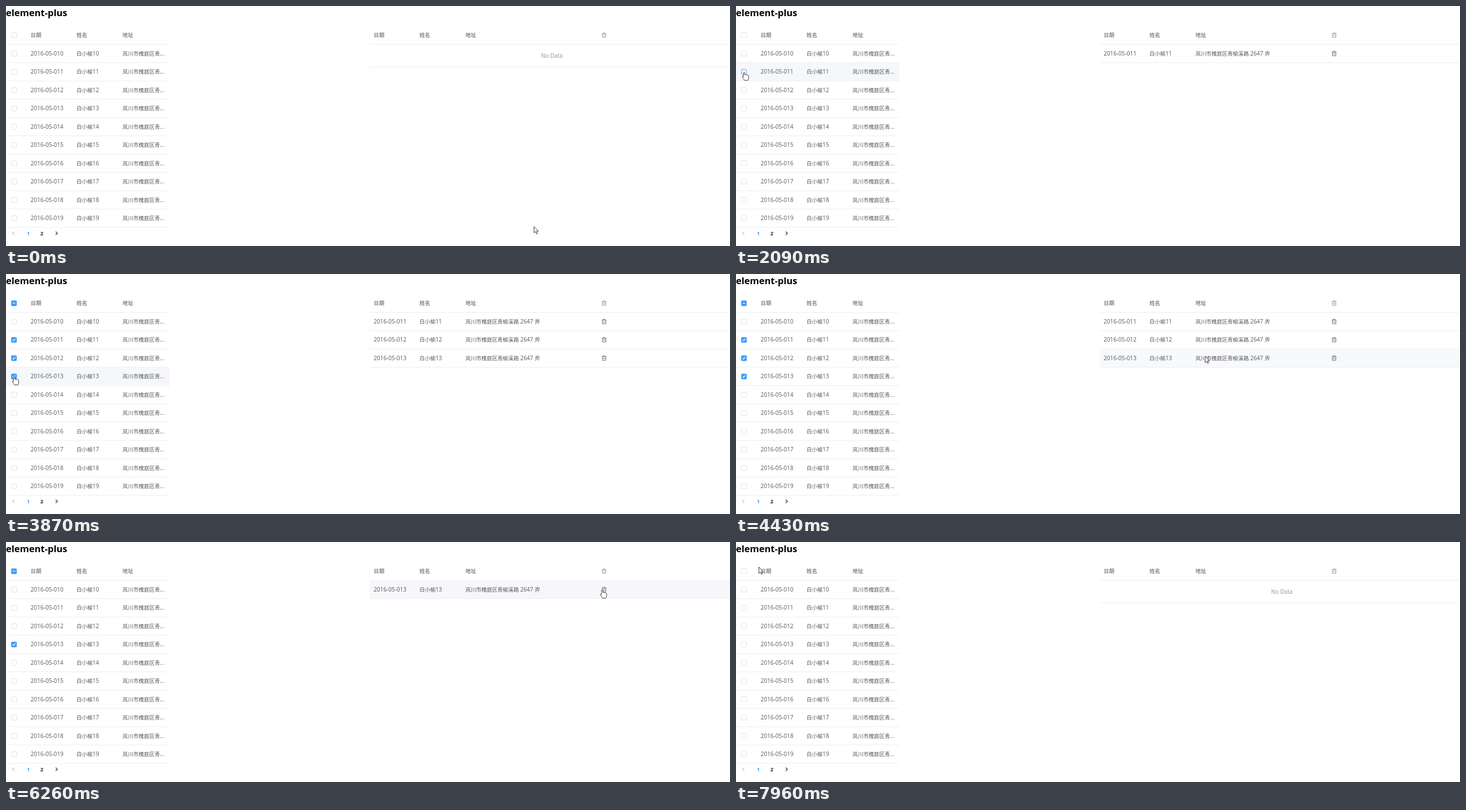
Write an HTML page with a canvas that moves like this. It is 1280 by 426 pixels and loops after 8000 ms.

```html
<!DOCTYPE html>
<html lang="zh-CN">
<head>
<meta charset="utf-8">
<title>element-plus</title>
<style>
html, body { margin: 0; width: 100%; height: 100%; overflow: hidden; background: #fff; }
canvas { display: block; }
</style>
</head>
<body>
<canvas id="stage" width="1280" height="426"></canvas>
<script>
const ctx = document.getElementById('stage').getContext('2d');
const LOOP = 8000, ROW = 32.45, TOP = 67.7, ROWS = 10;
const LEFT = { x: 0, width: 289, columns: [43.6, 124.8, 206] };
const RIGHT = { x: 643, width: 637, columns: [650, 731, 812.2] };
const BLUE = '#409eff', LINE = '#ebeef5', BODY = '#58595c', MUTED = '#858890';
const CJK = '"Noto Sans CJK SC", "Noto Sans CJK", sans-serif';
const LATIN = '"Open Sans", "Noto Sans", sans-serif';
const NAME = '白小榆', STREET = '岚川市槐庭区青榆溪路 2647 弄';

const clamp = v => Math.max(0, Math.min(1, v));
const lineY = i => TOP + ROW * i;
const midY = i => lineY(i + 0.5) + 0.6;

// Rows 1 to 3 are picked on the left, then removed on the right in the same order
const picks = [1, 2, 3].map(row => ({ row, on: 1345 + 735 * row, off: 4320 + 860 * row }));
const listed = t => picks.filter(p => t >= p.on && t < p.off);

// Each move sets off, arrives and rests until the next one
const checkboxAt = row => ({ x: 14.5, y: midY(row) });
const bin = { x: 1054, y: midY(0) };
const start = { x: 933.5, y: 391.5 };
const moves = [
  { from: 70, until: 70, to: { x: 598, y: 345 } },
  { from: 200, until: 1050, to: { x: -1.5, y: 215 } },
  { from: 1050, until: 1220, to: { x: -1.5, y: 142 } },
  { from: 1220, until: 1880, to: checkboxAt(1) },
  { from: 2350, until: 2490, to: checkboxAt(2) },
  { from: 3100, until: 3450, to: checkboxAt(3) },
  { from: 3900, until: 4430, to: { x: 829, y: 146 } },
  { from: 4430, until: 5060, to: bin },
  { from: 5450, until: 5640, to: { x: 1061.5, y: 81.5 } },
  { from: 5780, until: 5860, to: bin },
  { from: 6930, until: 7330, to: { x: 305.5, y: 98.5 } },
  { from: 7330, until: 7960, to: { x: 40.5, y: 44.5 } }
];

function cursorAt(t) {
  let { x, y } = start;
  for (const { from, until, to } of moves) {
    if (t < from) break;
    const k = clamp((t - from) / (until - from || 1)) || +(from === until);
    x += (to.x - x) * k;
    y += (to.y - y) * k;
  }
  return { x, y };
}

function isOver(t, table, row) {
  const { x, y } = cursorAt(t);
  return x >= table.x && x < table.x + table.width && y >= lineY(row) && y < lineY(row + 1);
}

// Share of the last 200 ms spent over the row, which gives the hover fade
function hoverTint(t, table, row) {
  let hits = 0;
  for (let ago = 0; ago < 200; ago += 20) hits += isOver(t - ago, table, row);
  return hits / 10;
}

function text(s, x, y, color = BODY, weight = 400) {
  ctx.fillStyle = color;
  for (const run of s.match(/[\u4e00-\u9fff]+|[^\u4e00-\u9fff]+/g)) {
    ctx.font = run > '\u4e00' ? `${weight} 9.45px ${CJK}` : `${weight} 10px ${LATIN}`;
    ctx.fillText(run, x, y);
    x += ctx.measureText(run).width;
  }
}

function rule(table, y) {
  ctx.fillStyle = LINE;
  ctx.fillRect(table.x, y, table.width, 1);
}

function stroke(d, x, y, color, width) {
  ctx.save();
  ctx.translate(x, y);
  ctx.strokeStyle = color;
  ctx.lineWidth = width;
  ctx.stroke(new Path2D(d));
  ctx.restore();
}

function checkbox(y, filled, mark, active) {
  ctx.beginPath();
  ctx.roundRect(9.6, y - 4.5, 9, 9, 1.2);
  ctx.lineWidth = 0.9;
  ctx.fillStyle = '#fff';
  ctx.strokeStyle = active ? BLUE : '#dcdfe6';
  ctx.fill();
  ctx.stroke();
  ctx.globalAlpha = filled;
  ctx.fillStyle = ctx.strokeStyle = BLUE;
  ctx.fill();
  ctx.stroke();
  stroke(mark, 14.1, y, '#fff', 1.1);
  ctx.globalAlpha = 1;
}

function trash(y, color) {
  stroke('M-4.2 -2.6H4.2M-1.8 -2.8V-4.2H1.8V-2.8M-3.1 -2.5V3.9H3.1V-2.5M-1.1 -.7V2.1M1.1 -.7V2.1',
    1057.5, y, color, 0.8);
}

function heading(table) {
  ['日期', '姓名', '地址'].forEach((s, i) => text(s, table.columns[i], 55.4, MUTED, 700));
  rule(table, lineY(0));
}

function record(t, table, place, id, address) {
  ctx.globalAlpha = hoverTint(t, table, place);
  ctx.fillStyle = '#f5f7fa';
  ctx.fillRect(table.x, lineY(place) + 1, table.width, ROW - 1);
  ctx.globalAlpha = 1;
  rule(table, lineY(place + 1));
  [`2016-05-01${id}`, `${NAME}1${id}`, address]
    .forEach((s, i) => text(s, table.columns[i], midY(place) + 3.5, BODY));
}

function leftTable(t, cursor) {
  heading(LEFT);
  checkbox(51.9, +(listed(t - 70).length > 0), 'M-2.4 0H2.4', false);
  for (let row = 0; row < ROWS; row++) {
    const pick = picks.find(p => p.row === row);
    const filled = pick ? clamp((t - pick.on - 100) / 100) * clamp((pick.off + 150 - t) / 100) : 0;
    record(t, LEFT, row, row, STREET.slice(0, 7) + '...');
    checkbox(midY(row), filled, 'M-2.4 0L-.7 1.8L2.5 -2', overCheckbox(cursor, row));
  }
}

function rightTable(t) {
  const rows = listed(t);
  heading(RIGHT);
  trash(51.9, MUTED);
  if (!rows.length) {
    text('No Data', 946, 92, '#909399');
    rule(RIGHT, 107.8);
  }
  rows.forEach((pick, place) => {
    record(t, RIGHT, place, pick.row, STREET);
    trash(midY(place), BODY);
  });
}

function pager() {
  const chevron = 'M-1.6 -3L1.6 0L-1.6 3';
  stroke('M1.6 -3L-1.6 0L1.6 3', 13, 403.5, '#c0c4cc', 1.1);
  stroke(chevron, 89.4, 403.5, '#303133', 1.1);
  ctx.font = `700 9px ${LATIN}`;
  ctx.fillStyle = BLUE;
  ctx.fillText('1', 37, 407);
  ctx.fillStyle = '#1d2030';
  ctx.fillText('2', 60.8, 407);
}

const near = (c, x, y) => Math.hypot(c.x - x, c.y - y) < 6;
const overCheckbox = (c, row) => near(c, 14, midY(row));

function pointer(t, c) {
  const overTrash = listed(t).some((_, place) => near(c, 1056, midY(place)) && c.x < 1061);
  const overBox = Array.from({ length: ROWS }, (_, row) => overCheckbox(c, row)).includes(true);
  const shape = new Path2D(overTrash || overBox
    ? 'M-1.2 1.2Q0 -.8 1.2 1.2V5Q2.5 4 3.6 5.4Q5 4.7 5.8 6Q7.8 5.6 7.9 7.6V11Q7.6 13 6.5 15H.5Q-.7 12.6 -2.7 10.4Q-3.9 8.6 -2.7 8.1Q-1.9 7.9 -1.2 9Z'
    : 'M0 0V11.2L2.6 8.9L4.4 13L6.1 12.2L4.4 8.2H7.8Z');
  ctx.save();
  ctx.translate(c.x, c.y);
  ctx.fillStyle = '#fff';
  ctx.strokeStyle = '#222';
  ctx.lineWidth = 0.85;
  ctx.lineJoin = 'round';
  ctx.fill(shape);
  ctx.stroke(shape);
  ctx.restore();
}

function draw(now) {
  const t = now % LOOP, cursor = cursorAt(t);
  ctx.fillStyle = '#fff';
  ctx.fillRect(0, 0, 1280, 426);
  ctx.fillStyle = '#000';
  ctx.font = `700 16.5px ${LATIN}`;
  ctx.fillText('element-plus', 0, 18);
  leftTable(t, cursor);
  rightTable(t);
  pager();
  pointer(t, cursor);
  requestAnimationFrame(draw);
}
requestAnimationFrame(draw);
</script>
</body>
</html>
```
